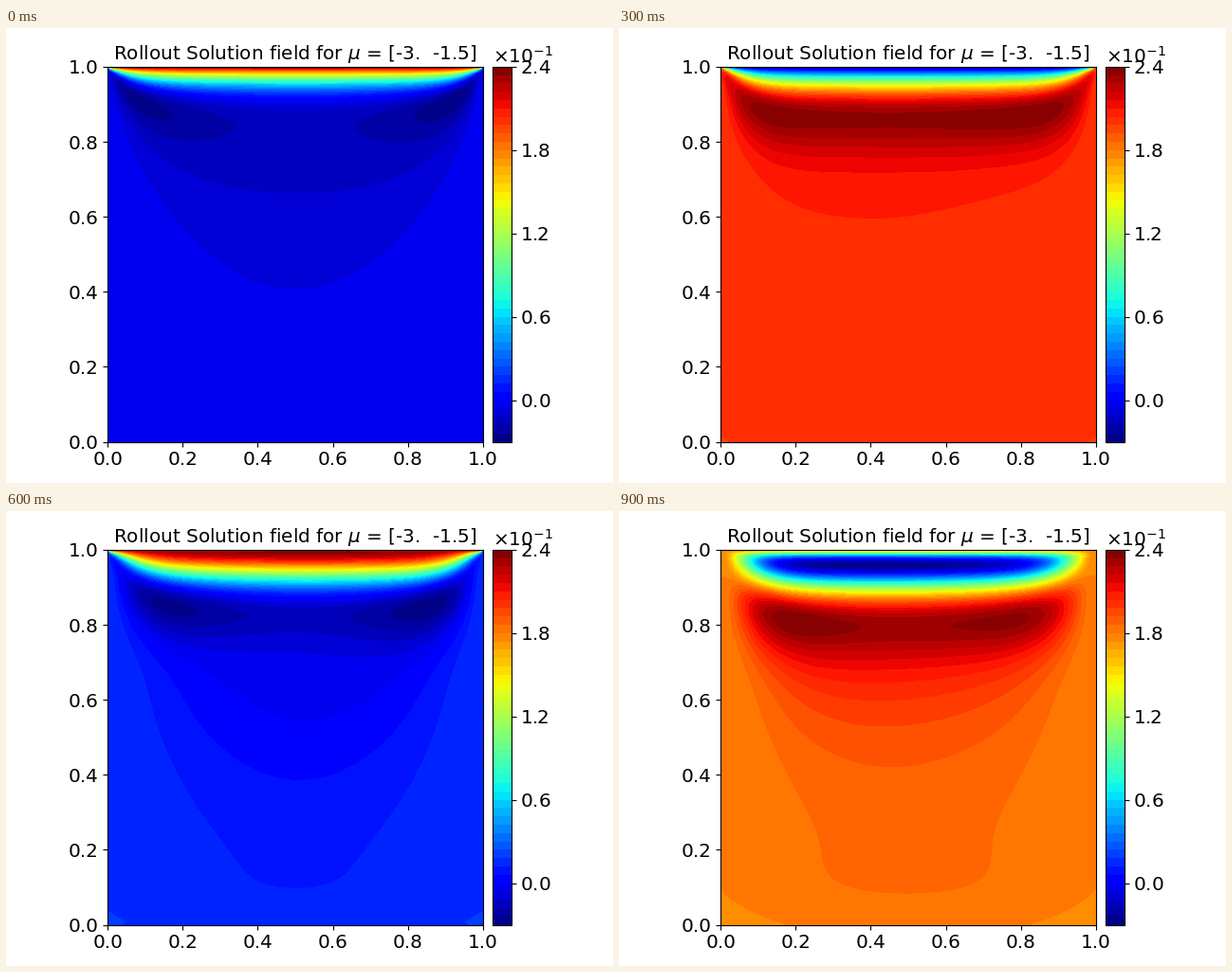
Animation of 640x480 px, one loop 1000 ms. Source, as a matplotlib script:

```python
import numpy as np
import matplotlib.pyplot as plt
from matplotlib.animation import FuncAnimation
from matplotlib.ticker import ScalarFormatter

WIDTH, HEIGHT, DPI = 640, 480, 100
FRAMES, INTERVAL = 10, 100
FRAMES_PER_PERIOD = 5

N = 128                  # grid cells per side of the unit cavity
H = 1 / N
VISCOSITY = 0.01
LID_SPEED = 0.25
STEPS = 250              # time steps per frame
DT = 1 / (FRAMES_PER_PERIOD * STEPS)

BAR_LEVELS = np.arange(-5, 41) * 0.006


def lid_velocity(t):
    return LID_SPEED * np.sin(2 * np.pi * t)


def make_poisson_solver():
    """Solve -laplace(psi) = w on interior nodes with a sine transform."""
    k = np.arange(1, N)
    sines = np.sin(np.pi * np.outer(k, k) / N)
    eigen = 4 / H**2 * np.sin(np.pi * k / (2 * N))**2
    scale = (2 / N)**2 / (eigen[:, None] + eigen[None, :])
    return lambda w: sines @ (scale * (sines @ w @ sines)) @ sines


def velocity(psi):
    u = (psi[2:, 1:-1] - psi[:-2, 1:-1]) / (2 * H)
    v = (psi[1:-1, :-2] - psi[1:-1, 2:]) / (2 * H)
    return u, v


def set_wall_vorticity(w, psi, lid):
    w[0] = -2 * psi[1] / H**2
    w[-1] = -2 * psi[-2] / H**2 - 2 * lid / H
    w[:, 0] = -2 * psi[:, 1] / H**2
    w[:, -1] = -2 * psi[:, -2] / H**2


def simulate():
    """Horizontal velocity in a cavity whose lid swings, starting at rest."""
    solve = make_poisson_solver()
    psi = np.zeros((N + 1, N + 1))
    w = np.zeros_like(psi)
    fields = []
    for step in range(FRAMES * STEPS):
        set_wall_vorticity(w, psi, lid_velocity(step * DT))
        u, v = velocity(psi)
        mid = w[1:-1, 1:-1]
        south, north = w[:-2, 1:-1], w[2:, 1:-1]
        west, east = w[1:-1, :-2], w[1:-1, 2:]
        diffusion = VISCOSITY * (south + north + west + east - 4 * mid) / H**2
        convection = (u * (east - west) + v * (north - south)) / (2 * H)
        w[1:-1, 1:-1] = mid + DT * (diffusion - convection)
        psi[1:-1, 1:-1] = solve(w[1:-1, 1:-1])

        if (step + 1) % STEPS == 0:
            field = np.zeros_like(psi)
            field[1:-1, 1:-1] = velocity(psi)[0]
            field[-1, 1:-1] = lid_velocity((step + 1) * DT)
            fields.append(field)
    return fields


def pixel_axes(left, bottom, width, height):
    return fig.add_axes([left / WIDTH, bottom / HEIGHT,
                         width / WIDTH, height / HEIGHT])


def draw_field(frame):
    field, levels = fields[frame], 50
    if frame == 0:
        field = np.clip(field, BAR_LEVELS[0] + 1e-5, BAR_LEVELS[-1] - 1e-5)
        levels = BAR_LEVELS
    return ax.contourf(grid, grid, field, levels, cmap="jet")


def update(frame):
    global contours
    contours.remove()
    contours = draw_field(frame)
    return [contours]


plt.rcParams.update({"font.family": "DejaVu Sans", "axes.titlesize": 14.4,
                     "xtick.labelsize": 14.4, "ytick.labelsize": 14.4})
fields = simulate()
grid = np.linspace(0, 1, N + 1)

fig = plt.figure(figsize=(WIDTH / DPI, HEIGHT / DPI), dpi=DPI)
ax = pixel_axes(107.2, 43.4, 395.7, 395.7)
bar_ax = pixel_axes(512.9, 43.4, 19.8, 395.7)

contours = draw_field(0)
ax.set(xlim=(0, 1), ylim=(0, 1),
       xticks=np.linspace(0, 1, 6), yticks=np.linspace(0, 1, 6))
ax.set_title(r"Rollout Solution field for $\mu$ = [-3.  -1.5]")

bar_format = ScalarFormatter(useMathText=True)
bar_format.set_powerlimits((0, 0))
fig.colorbar(contours, cax=bar_ax, format=bar_format,
             ticks=[0, 0.06, 0.12, 0.18, 0.24])
bar_ax.yaxis.set_offset_position("left")

anim = FuncAnimation(fig, update, frames=FRAMES, interval=INTERVAL, repeat=True)
plt.show()
```
